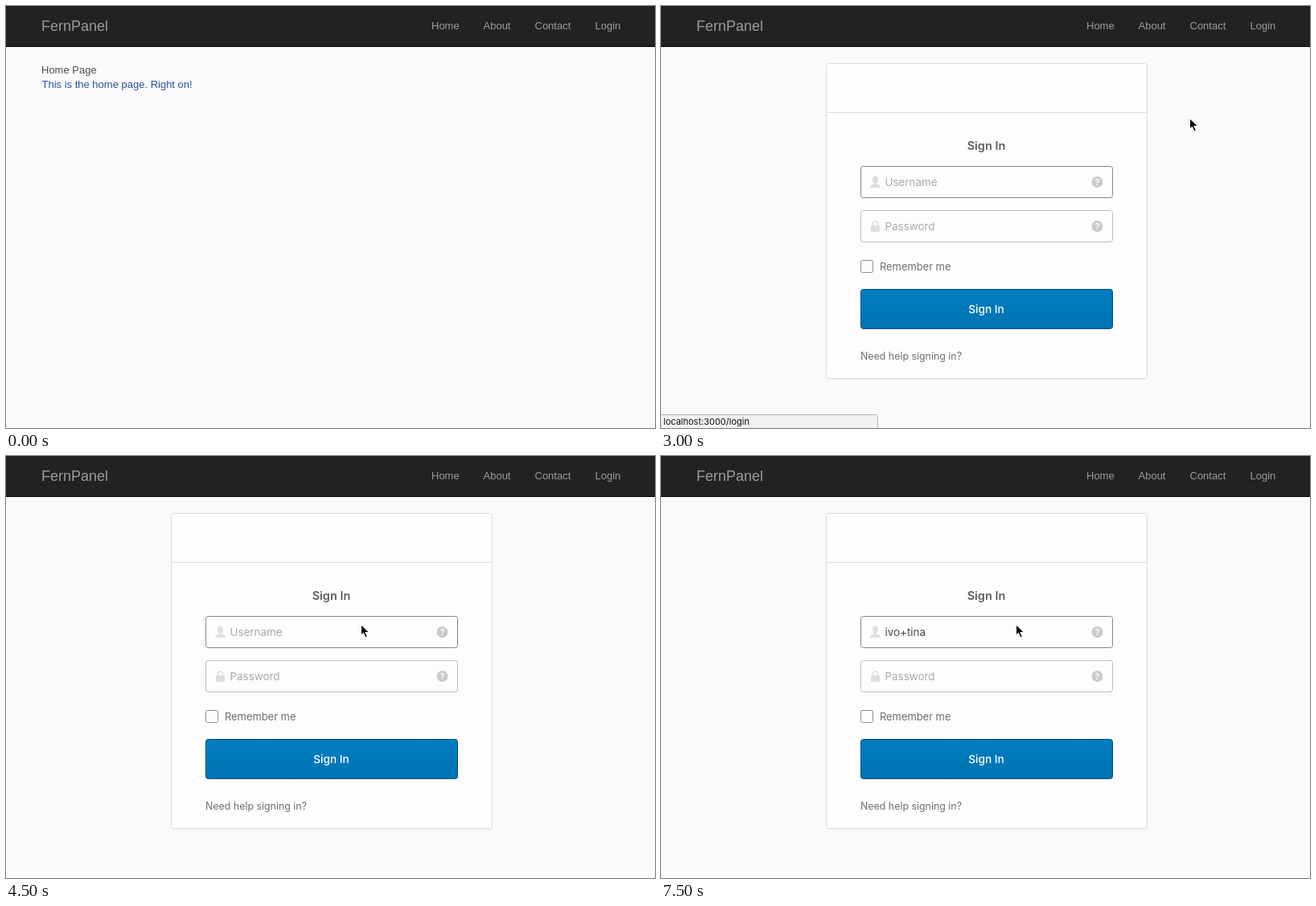
An HTML page with a canvas that plays this animation: 807x525 px, repeating every 8000 ms.

```html
<!DOCTYPE html>
<html lang="en">
<head>
<meta charset="utf-8">
<title>Sign in demo</title>
<style>
  html, body { margin: 0; width: 100%; height: 100%; overflow: hidden; background: #fafafa; }
  canvas { display: block; width: 807px; height: 525px; }
</style>
</head>
<body>
<canvas id="stage"></canvas>
<script>
const W = 807, H = 525, LOOP = 8000;
const canvas = document.getElementById('stage');
const ctx = canvas.getContext('2d');
const ratio = window.devicePixelRatio || 1;
canvas.width = W * ratio;
canvas.height = H * ratio;

const SANS = '"Liberation Sans", Arial, sans-serif';
const FORM = 'Inter, "Open Sans", sans-serif';
const INPUT_FONT = `13.4px ${FORM}`;
const USER = 'ivo+tina';

// Each track lists [start time, value]; values hold until the next entry.
const CURSOR = [
  [0, null], [500, [699, 18]], [750, [751, 44]], [1000, [746, 31]],
  [1250, [747, 27]], [1750, [746, 27]], [2750, [746, 29]], [3000, [657, 139]],
  [3250, [497, 231]], [3500, [446, 242]], [3750, [442, 211]], [4000, [441, 209]]
];
const HOVER = [[0, ''], [1750, 'brand'], [2500, 'Login'], [3000, '']];
const PAGE = [[0, 'home'], [2750, 'blank'], [3000, 'login']];
const STATUS = [[0, 0], [2500, 0.5], [2750, 1], [3250, 0]];
const TYPED = [[0, 0], [4750, 1], [5000, 3], [6000, 4], [6500, 5], [6750, 7], [7000, 8]];
const CARET = [[0, false], [3250, true], [4500, false], [4750, true],
  [5500, false], [6000, true], [7500, false]];
const TIP = [[0, false], [3250, true], [3500, false]];

function at(track, t) {
  let value = track[0][1];
  for (const [start, v] of track) if (t >= start) value = v;
  return value;
}

function text(str, x, y, font, color, align = 'left') {
  ctx.font = font;
  ctx.fillStyle = color;
  ctx.textAlign = align;
  ctx.fillText(str, x, y);
}

function box(x, y, w, h, r, fill, stroke) {
  ctx.beginPath();
  ctx.roundRect(x, y, w, h, r);
  if (fill) { ctx.fillStyle = fill; ctx.fill(); }
  if (stroke) { ctx.strokeStyle = stroke; ctx.lineWidth = 1; ctx.stroke(); }
}

function polygon(points) {
  ctx.beginPath();
  points.forEach(([x, y]) => ctx.lineTo(x, y));
  ctx.closePath();
}

function header(hover) {
  const tint = name => hover === name ? '#fff' : '#9d9d9d';
  ctx.fillStyle = '#222';
  ctx.fillRect(0, 0, W, 50);
  ctx.fillStyle = '#080808';
  ctx.fillRect(0, 50, W, 1);
  text('FernPanel', 44, 31, `18px ${SANS}`, tint('brand'));
  const links = { Home: 529, About: 593.5, Contact: 657.5, Login: 732.5 };
  for (const name in links) text(name, links[name], 29, `13px ${SANS}`, tint(name));
}

function homePage() {
  text('Home Page', 44, 84, `13px ${SANS}`, '#4d4d4d');
  text('This is the home page. Right on!', 44.5, 102, `13px ${SANS}`, '#2c5597');
}

function statusBar(alpha) {
  ctx.globalAlpha = alpha;
  box(-4.5, 508.5, 274, 24, 3, '#f1f1f1', '#b2b2b2');
  text('localhost:3000/login', 3, 521, `11px ${FORM}`, '#111');
  ctx.globalAlpha = 1;
}

function helpBadge(x, y) {
  ctx.beginPath();
  ctx.arc(x, y, 7, 0, Math.PI * 2);
  ctx.fillStyle = '#cacaca';
  ctx.fill();
  text('?', x, y + 3.7, `bold 10px ${FORM}`, '#fff', 'center');
}

function userIcon() {
  ctx.fillStyle = '#dedede';
  ctx.beginPath();
  ctx.ellipse(266.5, 216, 3.4, 4.2, 0, 0, Math.PI * 2);
  ctx.fill();
  ctx.fillRect(265, 218, 3, 5);
  ctx.beginPath();
  ctx.moveTo(260, 226);
  ctx.quadraticCurveTo(260, 222.5, 265, 221.5);
  ctx.lineTo(268, 221.5);
  ctx.quadraticCurveTo(273, 222.5, 273, 226);
  ctx.fill();
}

function lockIcon() {
  box(261, 273, 11, 8, 1, '#dedede');
  ctx.beginPath();
  ctx.moveTo(263.5, 274);
  ctx.lineTo(263.5, 271);
  ctx.arc(266.5, 271, 3, Math.PI, 0);
  ctx.lineTo(269.5, 274);
  ctx.strokeStyle = '#dedede';
  ctx.lineWidth = 1.7;
  ctx.stroke();
}

function usernameText(t) {
  const typed = USER.slice(0, at(TYPED, t));
  text(typed || 'Username', 278.5, 224, INPUT_FONT, typed ? '#484848' : '#a9a9a9');
  if (at(CARET, t)) {
    const x = 279 + Math.round(ctx.measureText(typed).width);
    ctx.fillStyle = '#222';
    ctx.fillRect(typed ? x : 279, 211, 1, 16);
  }
}

function loginPage(t) {
  box(205.5, 72.5, 399, 392, 3, '#ececec');
  box(205.5, 71.5, 399, 392, 3, '#fdfdfd', '#dcdcdc');
  ctx.fillStyle = '#dcdcdc';
  ctx.fillRect(206, 132, 398, 1);
  text('Sign In', 404.5, 179, `600 14.5px ${FORM}`, '#5e5e5e', 'center');

  box(248.5, 199.5, 313, 39, 3, '#fdfdfd', '#858585');
  box(248.5, 254.5, 313, 39, 3, '#fdfdfd', '#bcbcbc');
  userIcon();
  lockIcon();
  helpBadge(542.5, 219);
  helpBadge(542.5, 274);
  usernameText(t);
  text('Password', 278.5, 279, INPUT_FONT, '#a9a9a9');

  box(248.5, 316.5, 15, 15, 2, '#fdfdfd', '#8c8c8c');
  text('Remember me', 272, 329, `12.9px ${FORM}`, '#6e6e6e');

  const blue = ctx.createLinearGradient(0, 352, 0, 402);
  blue.addColorStop(0, '#007dc1');
  blue.addColorStop(1, '#0073b2');
  box(248.5, 352.5, 313, 49, 3, blue, '#004b75');
  text('Sign In', 404.5, 382, `500 13.7px ${FORM}`, '#fff', 'center');
  text('Need help signing in?', 248, 440, `12.4px ${FORM}`, '#6e6e6e');
}

function tooltip() {
  ctx.fillStyle = 'rgba(150,150,150,.43)';
  ctx.beginPath();
  ctx.roundRect(543, 162, 101, 37, [3, 3, 3, 0]);
  ctx.fill();
  polygon([[543, 199], [550, 199], [543, 206]]);
  ctx.fill();
  text('Username', 593.5, 184, INPUT_FONT, 'rgba(255,255,255,.85)', 'center');
}

function pointer([x, y]) {
  ctx.save();
  ctx.translate(x, y);
  polygon([[0.5, 0.5], [0.5, 14.2], [3.5, 11.4], [5.9, 17], [8.4, 15.9], [6, 10.4], [10.3, 10.2]]);
  ctx.fillStyle = '#000';
  ctx.fill();
  ctx.strokeStyle = '#fff';
  ctx.lineWidth = 1.1;
  ctx.stroke();
  ctx.restore();
}

function draw() {
  const t = performance.now() % LOOP;
  ctx.setTransform(ratio, 0, 0, ratio, 0, 0);
  ctx.fillStyle = '#fafafa';
  ctx.fillRect(0, 0, W, H);

  header(at(HOVER, t));
  const page = at(PAGE, t);
  if (page === 'home') homePage();
  if (page === 'login') loginPage(t);
  if (at(TIP, t)) tooltip();
  const status = at(STATUS, t);
  if (status) statusBar(status);
  const cursor = at(CURSOR, t);
  if (cursor) pointer(cursor);

  requestAnimationFrame(draw);
}
draw();
</script>
</body>
</html>
```
